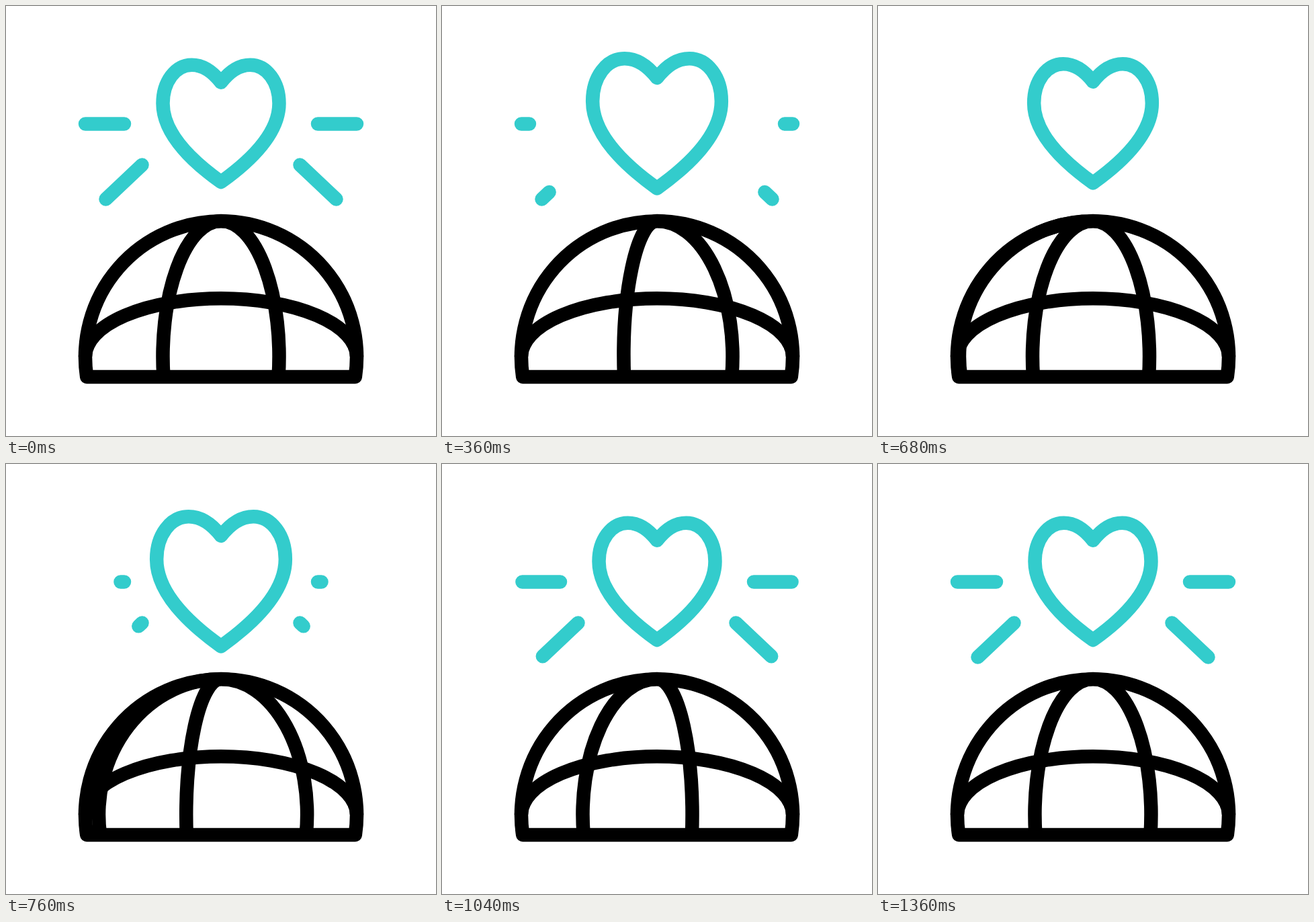
Write an HTML page that moves like this. It is 640 px wide and 640 px high and loops after 1440 ms.

```html
<!DOCTYPE html>
<html lang="en">
<head>
<meta charset="utf-8">
<title>Globe and heart</title>
<style>
  html, body { margin: 0; height: 100%; overflow: hidden; background: #fff; }
  svg { display: block; width: 100vw; height: 100vh; }
  path { fill: none; stroke-width: 20.5; stroke-linejoin: round; }
  #love { stroke: #33cccc; stroke-linecap: round; }
  #globe { stroke: #000; }
</style>
</head>
<body>
<svg viewBox="0 0 640 640">
  <g id="love">
    <path id="heart" vector-effect="non-scaling-stroke"/>
    <path id="rays"/>
  </g>
  <g id="globe">
    <path d="M120.2 552A202 202 0 1 1 519.8 552Z"/>
    <path d="M118 522A202 86.7 0 0 1 522 522"/>
    <path id="meridians"/>
  </g>
</svg>
<script>
const LOOP = 1440, STEP = 40, CX = 320, HEART_Y = 176, RADIUS = 202;
const heart = document.getElementById('heart');
const rays = document.getElementById('rays');
const meridians = document.getElementById('meridians');

// Rays on the left side: inner end, outer end
const RAYS = [[176, 175.5, 118, 175.5], [202.5, 236.5, 148.5, 287.5]];

// Half width of each meridian over time: [ms, px], negative is left
const MERIDIANS = [
  [[0, 86.5], [360, 112.5], [520, 150], [680, 202]],
  [[0, -86.5], [360, -49.5], [520, 5], [680, 84], [880, 186], [940, 202]],
  [[420, -202], [520, -162.5], [680, -90], [880, 2], [1040, 52.5], [1380, 86.5]],
  [[640, -202], [680, -199], [880, -146], [1040, -110.5], [1380, -86.5]]
];

const ease = (t, start, length) => {
  const u = Math.min(1, Math.max(0, (t - start) / length));
  return Math.sin(u * Math.PI / 2) ** 2;
};

// Smooth curve through the keys, at rest at both ends
function follow(keys, t) {
  const last = keys.length - 1;
  if (t <= keys[0][0]) return keys[0][1];
  if (t >= keys[last][0]) return keys[last][1];
  const gap = i => keys[i + 1][0] - keys[i][0];
  const rate = i => (keys[i + 1][1] - keys[i][1]) / gap(i);
  const slope = i => i === 0 || i === last ? 0
    : (rate(i - 1) * gap(i) + rate(i) * gap(i - 1)) / (gap(i - 1) + gap(i));
  const i = keys.findIndex(key => key[0] > t) - 1;
  const h = gap(i), u = (t - keys[i][0]) / h, v = 1 - u;
  return v * v * (1 + 2 * u) * keys[i][1] + u * u * (3 - 2 * u) * keys[i + 1][1]
    + h * u * v * (v * slope(i) - u * slope(i + 1));
}

function heartPath(scale) {
  const half = side => {
    const p = (x, y) => `${CX + side * (x - CX) * scale} ${HEART_Y + (y - HEART_Y) * scale} `;
    return {
      down: 'M' + p(320, 113.7) + 'C' + p(310, 100.8) + p(295, 87.7) + p(276.5, 87.7)
        + 'C' + p(252, 87.7) + p(233.5, 113) + p(233.5, 145)
        + 'C' + p(233.5, 191) + p(278, 232) + p(320, 262),
      up: 'C' + p(278, 232) + p(233.5, 191) + p(233.5, 145)
        + 'C' + p(233.5, 113) + p(252, 87.7) + p(276.5, 87.7)
        + 'C' + p(295, 87.7) + p(310, 100.8) + p(320, 113.7) + 'Z'
    };
  };
  return half(1).down + half(-1).up;
}

function raysPath(from, to) {
  if (to - from < 0.001) return '';
  return RAYS.map(([x1, y1, x2, y2]) => {
    const at = (k, flip) => {
      const x = x1 + (x2 - x1) * k;
      return `${flip ? 640 - x : x} ${y1 + (y2 - y1) * k}`;
    };
    return [false, true].map(flip => `M${at(from, flip)}L${at(to, flip)}`).join('');
  }).join('');
}

function meridianPath(r) {
  if (Math.abs(r) >= RADIUS) return '';
  return `M${CX + r * 0.989} 552A${Math.abs(r)} ${RADIUS} 0 0 ${r < 0 ? 1 : 0} ${CX} 320`;
}

function draw(t) {
  const beat = t > 240 && t < 1040 ? Math.sin(Math.PI * (t - 240) / 400) ** 2 : 0;
  heart.setAttribute('d', heartPath(1 + 0.165 * beat));
  rays.setAttribute('d', t < 600 ? raysPath(ease(t, 80, 400), 1) : raysPath(0, ease(t, 680, 400)));
  meridians.setAttribute('d', MERIDIANS.map(keys => meridianPath(follow(keys, t))).join(''));
}

const start = performance.now();
function tick() {
  const t = (performance.now() - start) % LOOP;
  draw(Math.floor(t / STEP) * STEP);
  requestAnimationFrame(tick);
}
tick();
</script>
</body>
</html>
```
